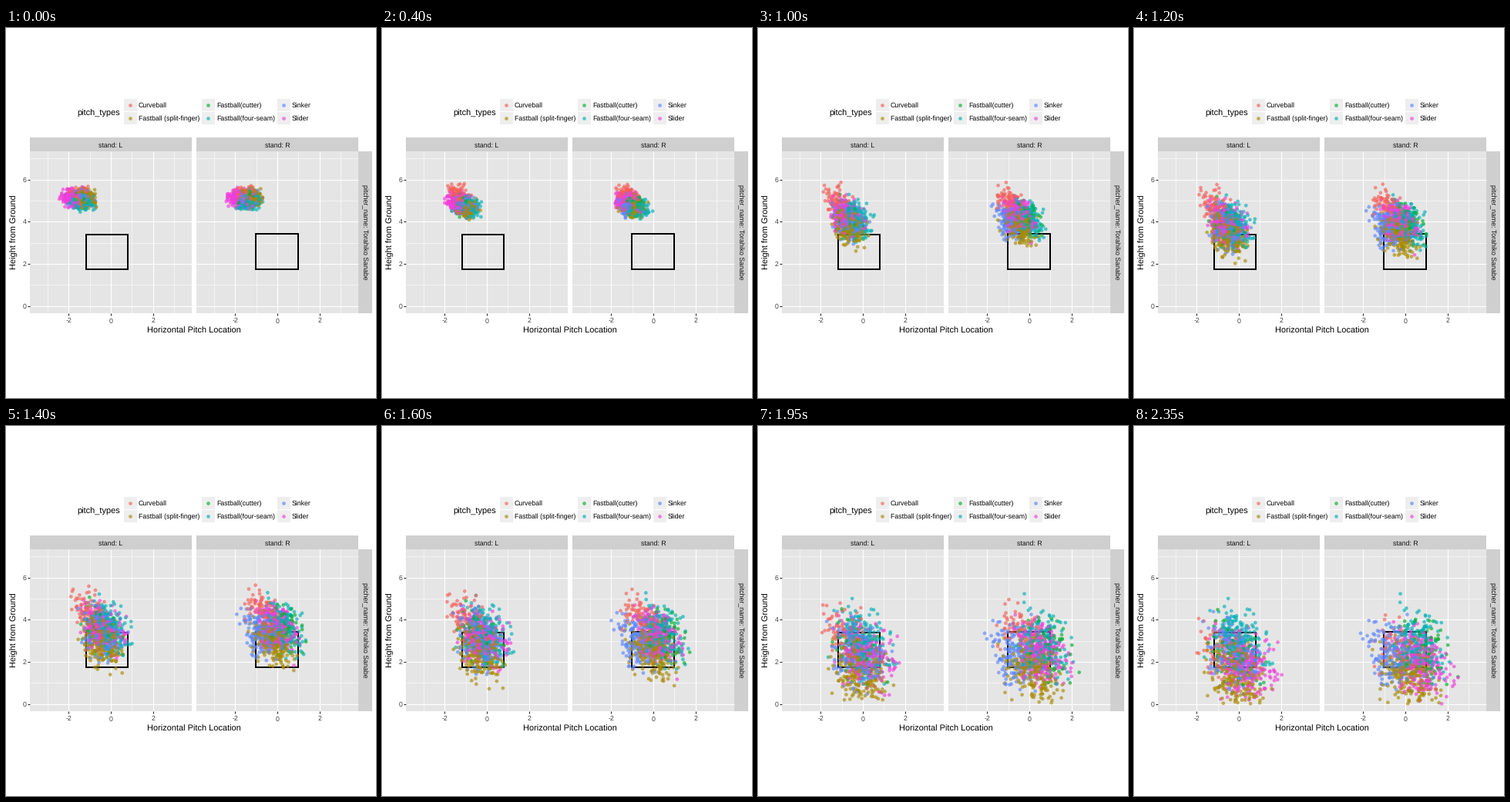
Write a matplotlib script that moves like this. It is 480x480 px and loops after 2400 ms.

```python
import numpy as np
import matplotlib.pyplot as plt
from matplotlib.animation import FuncAnimation
from matplotlib.patches import Rectangle

SIZE, DPI = 480, 96
PT = 72 / DPI          # points per pixel
FRAMES, INTERVAL = 48, 50
STEP = 0.01            # seconds of flight per frame
UNIT = 27.3            # pixels per foot
BASE_Y = 360.5         # ground level
TOP, SIDE = 160, 210
BOTTOM = TOP + SIDE
LEFTS = {"L": 31, "R": 247}
MIDDLE = SIDE / 2      # plate centre inside a panel

PANEL, STRIP, KEY = "#e5e5e5", "#cfcfcf", "#eeeeee"
INK, TICK = "#111111", "#404040"
ALPHA, DOT = 0.65, 4.7

PITCHES = 1020         # per panel
GRAVITY = -32
REACH = 34.7           # mph times seconds to the plate
SPREAD_X, SPREAD_Z, TILT = 0.63, 0.75, -0.35

# name: colour, share, mph, lift, release x, plate x, plate z, shift for R
TYPES = {
    "Curveball": ("#f65f56", 0.07, 74, -3, -1.5, -0.7, 2.5, 0.6),
    "Fastball (split-finger)": ("#aa8a00", 0.24, 85, 5, -1.3, -0.1, 1.3, 0.3),
    "Fastball(cutter)": ("#00b02c", 0.07, 88, 11, -1.5, -0.2, 2.5, 1.3),
    "Fastball(four-seam)": ("#00b2b8", 0.19, 92, 17, -1.4, 0.1, 2.8, 0.6),
    "Sinker": ("#5b86ff", 0.18, 91, 10, -1.4, -0.3, 2.4, -0.2),
    "Slider": ("#f23ddd", 0.25, 81, 4, -1.8, 0.3, 1.9, 0.5),
}


def make_pitches(rng):
    """Columns: panel left, x0, z0, vx, vz, ax, az, flight time, type."""
    def bell(mean, sd, n):
        return mean + sd * 2 * (rng.random((3, n)).sum(axis=0) - 1.5)

    groups = []
    for side, left in LEFTS.items():
        for kind, spec in enumerate(TYPES.values()):
            _, share, mph, lift, rx, px, pz, shift = spec
            n = round(PITCHES * share)
            t = REACH / bell(mph, 1.5, n)
            x0 = bell(rx, 0.27, n)
            z0 = bell(5.2 - 0.012 * lift, 0.19, n)
            ax = bell(-0.7 * lift, 3, n)
            az = bell(GRAVITY + lift, 2.5, n)
            off_x = bell(0, SPREAD_X, n)
            off_z = bell(0, SPREAD_Z, n) + TILT * off_x
            end_x = px + shift * (side == "R") + off_x
            vx = (end_x - x0) / t - ax * t / 2
            vz = (pz + off_z - z0) / t - az * t / 2
            groups.append(np.column_stack(
                [np.full(n, left), x0, z0, vx, vz, ax, az, t,
                 np.full(n, kind)]))
    return rng.permutation(np.vstack(groups))


pitches = make_pitches(np.random.default_rng(19))
lefts, x0, z0, vx, vz, acc_x, acc_z, flight, kinds = pitches.T
colours = [spec[0] for spec in TYPES.values()]

plt.rcParams["font.family"] = "Liberation Sans"
plt.rcParams["text.hinting"] = "none"
fig = plt.figure(figsize=(SIZE / DPI, SIZE / DPI), dpi=DPI, facecolor="white")
ax = fig.add_axes([0, 0, 1, 1])
ax.set_xlim(0, SIZE)
ax.set_ylim(SIZE, 0)
ax.axis("off")


def box(x, y, w, h, colour):
    ax.add_patch(Rectangle((x, y), w, h, fc=colour, lw=0, zorder=1))


def line(xs, ys, width, colour):
    ax.plot(xs, ys, color=colour, lw=width * PT, zorder=2,
            solid_capstyle="butt")


def label(x, y, text, size=8.8, colour=INK, **kw):
    ax.text(x, y, text, fontsize=size * PT, color=colour, zorder=6, **kw)


def dots(x, y, colour, zorder):
    return ax.scatter(x, y, s=(DOT * PT) ** 2, c=colour, alpha=ALPHA,
                      linewidths=0, zorder=zorder)


def draw_panel(side, left):
    mid, right = left + MIDDLE, left + SIDE
    box(left, 142, SIDE, 18, STRIP)
    label(mid, 155, f"stand: {side}", ha="center")
    box(left, TOP, SIDE, SIDE, PANEL)
    for first, width in ((1, 0.55), (0, 1.1)):      # minor, then major
        for x in range(first - 4, 4, 2):
            px = mid + x * UNIT
            if px > left:
                line([px, px], [TOP, BOTTOM], width, "white")
        for z in range(first, 8 - (first == 0), 2):
            py = BASE_Y - z * UNIT
            line([left, right], [py, py], width, "white")
    for x in (-2, 0, 2):
        px = mid + x * UNIT
        line([px, px], [BOTTOM, BOTTOM + 3], 1.1, "#2a2a2a")
        label(px, 382.5, str(x), colour=TICK, ha="center")


def draw_zone(x, y, w, h):
    ax.add_patch(Rectangle((x, y), w, h, fill=False, ec="black",
                           lw=2 * PT, joinstyle="miter", zorder=3))


def draw_legend():
    label(92, 113.7, "pitch_types", 11, "black")
    for i, (name, colour) in enumerate(zip(TYPES, colours)):
        x = (153, 254, 352)[i // 2]
        y = 91.5 + 17.3 * (i % 2)
        box(x, y, 16.5, 16.5, KEY)
        dots([x + 8.2], [y + 8.2], [colour], 5)
        label(x + 19, y + 11.4, name, colour="black")


def draw_axes_text():
    for z in range(0, 8, 2):
        y = BASE_Y - z * UNIT
        line([28, 31], [y, y], 1.1, "#2a2a2a")
        label(26.5, y + 3, str(z), colour=TICK, ha="right")
    middle = dict(ha="center", va="center")
    box(457, TOP, 17.5, SIDE, STRIP)
    label(465, 265, "pitcher_name: Torahiko Sanabe", rotation=270, **middle)
    label(244, 395.8, "Horizontal Pitch Location", 11, "black", ha="center")
    label(11, 265, "Height from Ground", 11, "black", rotation=90, **middle)


for side, left in LEFTS.items():
    draw_panel(side, left)
draw_axes_text()
draw_legend()
draw_zone(104, 268, 54, 45)
draw_zone(324, 267, 55, 46)


def positions(frame):
    t = np.minimum(frame * STEP, flight)   # pitches rest at the plate
    x = x0 + vx * t + acc_x * t ** 2 / 2
    z = z0 + vz * t + acc_z * t ** 2 / 2
    x = np.where((z < 0) | (np.abs(x) > 3.5), np.nan, x)
    return np.column_stack([lefts + MIDDLE + x * UNIT, BASE_Y - z * UNIT])


cloud = dots(*positions(0).T, [colours[int(k)] for k in kinds], 4)


def update(frame):
    cloud.set_offsets(np.ma.masked_invalid(positions(frame)))
    return [cloud]


anim = FuncAnimation(fig, update, frames=FRAMES, interval=INTERVAL,
                     repeat=True, repeat_delay=0, blit=False)
plt.show()
```
